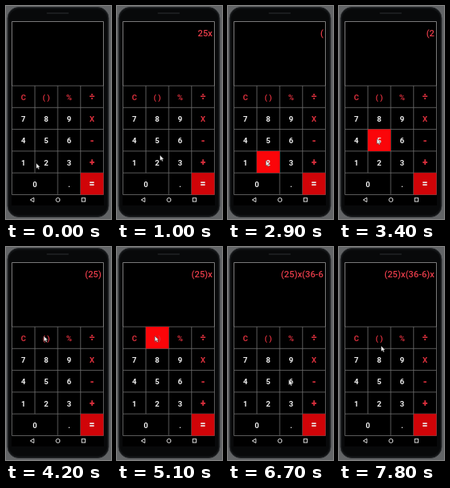
Recreate the animation shown at these times as an HTML page. Size 132 by 267 pixels, loop 8 s.

```html
<!DOCTYPE html>
<html lang="en">
<head>
<meta charset="utf-8">
<title>Calculator</title>
<style>
  html, body { margin: 0; width: 100%; height: 100%; overflow: hidden; background: #626466; }
  svg { display: block; width: 132px; height: 267px; }
  text { font-family: Roboto, Arial, sans-serif; }
  .key { font-size: 9.7px; font-weight: 700; text-anchor: middle; }
  .sign { font-size: 12px; font-weight: 900; }
  #display { font-size: 11.3px; font-weight: 500; text-anchor: end; fill: #e63c49; }
</style>
</head>
<body>
<svg viewBox="0 0 132 267">
  <rect x="2" y="1.5" width="127" height="263" rx="14" fill="#101214" stroke="#2c2e30"/>
  <rect x="4" y="4" width="123" height="258" rx="12" fill="#08090a"/>
  <rect x="51" y="8" width="28" height="2" rx="1" fill="#1a1c1e"/>
  <rect x="7" y="19" width="116" height="231" fill="#000"/>
  <path id="lines" fill="none" stroke="#707070" stroke-width=".8"/>
  <path d="M7.5 100V19.5H122.5V100" fill="none" stroke="#999" stroke-width=".8"/>
  <g id="pad"></g>
  <g id="labels"></g>
  <text id="display" x="120" y="38.3"></text>
  <g fill="none" stroke="#ddd">
    <path d="M35 240.3V245.7L30.5 243Z"/>
    <circle cx="65.3" cy="243" r="2.5"/>
    <rect x="95.2" y="240.7" width="4.4" height="4.4"/>
  </g>
  <path id="cursor" d="M0 0V6.8L1.6 5.4L2.8 7.8L4 7.2L2.9 4.9H5Z" fill="#eee" stroke="#222" stroke-width=".4"/>
</svg>
<script>
const LOOP = 8000, STEP = 100, HOLD = 200, TRAVEL = 200;
const LEFT = 7.5, TOP = 100, COL = 28.75, ROW = 27.3;
const $ = id => document.getElementById(id);

function add(parent, tag, attrs, text = '') {
  const el = document.createElementNS('http://www.w3.org/2000/svg', tag);
  for (const name in attrs) el.setAttribute(name, attrs[name]);
  el.textContent = text;
  parent.append(el);
  return el;
}

// An underscore marks the slot covered by the wide "0" key.
const keys = {};
['C()%÷', '789X', '456-', '123+', '0_.='].forEach((line, r) => {
  line.match(/\(\)|./g).forEach((name, c) => {
    if (name === '_') return;
    const width = name === '0' ? COL * 2 : COL;
    const x = LEFT + c * COL, y = TOP + r * ROW;
    const equals = name === '=', sign = '÷-+='.includes(name);
    const base = equals ? '#d00408' : 'none';
    const rect = add($('pad'), 'rect', { x, y, width, height: ROW, fill: base });
    add($('labels'), 'text', {
      class: sign ? 'key sign' : 'key',
      x: x + width / 2, y: y + (sign ? 18.2 : 17.6),
      fill: !equals && (r === 0 || c === 3) ? '#d92f3c' : '#eee'
    }, name === '()' ? '( )' : name);
    keys[name] = { rect, base, x: x + width / 2, y: y + ROW / 2 };
  });
});

let grid = '';
for (let i = 0; i <= 5; i++) grid += `M${LEFT} ${TOP + i * ROW}h${COL * 4}`;
for (let i = 0; i <= 4; i++) grid += `M${LEFT + i * COL} ${TOP}v${ROW * (i === 1 ? 4 : 5)}`;
$('lines').setAttribute('d', grid);

// Release time and key of every press
const presses = [
  [300, '2'], [600, '5'], [800, 'X'], [1400, 'C'],
  [2700, '()'], [3100, '2'], [3600, '5'], [4200, '()'],
  [4900, 'X'], [5200, '()'], [5450, '3'], [5700, '6'],
  [6200, '-'], [6600, '6'], [7100, '()'], [7600, 'X']
];

// Points the pointer passes away from a press: time, x, y
const passes = [[0, 38, 197], [1000, 54, 187], [5800, 113, 174], [7800, 53, 124]];

const stops = [
  ...presses.map(([t, name]) =>
    ({ arrive: t - HOLD, leave: t, x: keys[name].x - 3, y: keys[name].y - 2 })),
  ...passes.map(([t, x, y]) => ({ arrive: t, leave: t, x, y }))
].sort((a, b) => a.arrive - b.arrive);

function pointer(t) {
  const i = stops.findIndex(s => s.arrive > t);
  const a = stops.at(i < 0 ? -1 : i - 1), b = i < 0 ? a : stops[i];
  const from = Math.max(a.leave, b.arrive - TRAVEL);
  const k = b === a || t <= from ? 0 : (t - from) / (b.arrive - from);
  const e = k * k * (3 - 2 * k);
  return [a.x + (b.x - a.x) * e, a.y + (b.y - a.y) * e];
}

function type(text, name) {
  if (name === 'C') return '';
  if (name === '()') return text + (text.lastIndexOf('(') > text.lastIndexOf(')') ? ')' : '(');
  return text + name.toLowerCase();
}

function draw(t) {
  $('display').textContent = presses
    .filter(p => p[0] <= t)
    .reduce((text, p) => type(text, p[1]), '');
  const held = presses.find(p => t >= p[0] - HOLD && t < p[0]);
  for (const name in keys) {
    const { rect, base } = keys[name];
    rect.setAttribute('fill', held && held[1] === name ? '#fb0509' : base);
  }
  $('cursor').setAttribute('transform', `translate(${pointer(t)})`);
}

const start = performance.now();
function tick() {
  const t = (performance.now() - start) % LOOP;
  draw(Math.floor(t / STEP) * STEP);
  requestAnimationFrame(tick);
}
tick();
</script>
</body>
</html>
```
